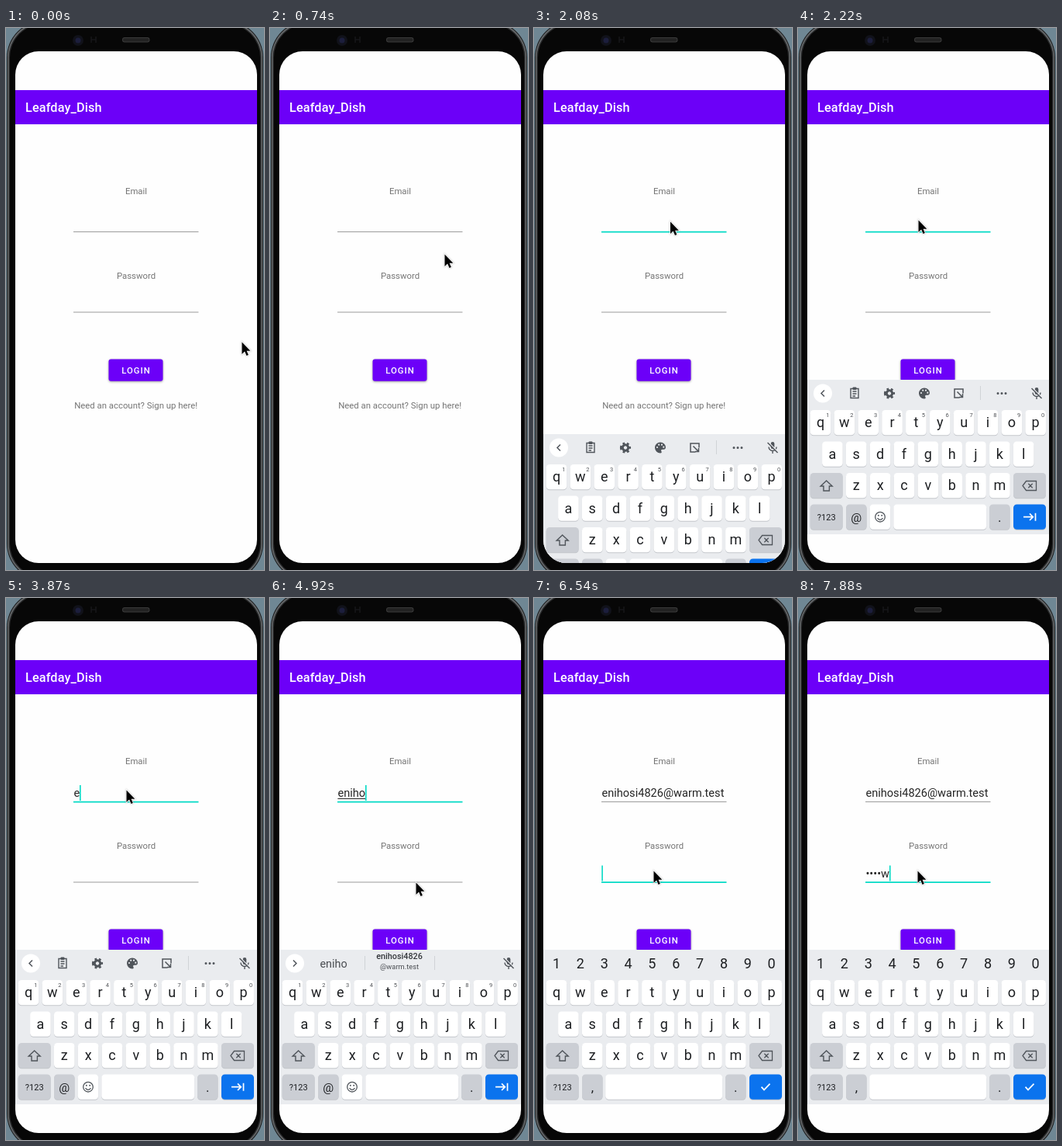
Write an HTML page with a canvas that moves like this. It is 333 by 698 pixels and loops after 8 s.

```html
<!DOCTYPE html>
<html lang="en">
<head>
<meta charset="utf-8">
<title>Login screen</title>
<style>
  html, body { margin: 0; width: 100%; height: 100%; overflow: hidden; background: #000; }
  canvas { display: block; width: 333px; height: 698px; }
</style>
</head>
<body>
<canvas id="stage"></canvas>
<script>
const LOOP = 8000, TICK = 148.8;
const PURPLE = '#6c00f8', TEAL = '#03dac5', GREY = '#757575', ICON = '#50555b', KEY_TEXT = '#1d1f22';
const USER = 'enihosi4826', HOST = '@warm.test', SECRET = 'demow';
const PITCH = 30.85;

const canvas = document.getElementById('stage');
const c = canvas.getContext('2d');
const ratio = window.devicePixelRatio || 1;
canvas.width = 333 * ratio;
canvas.height = 698 * ratio;

// Pointer stops: tick, x, y
const pointerStops = [
  [0, 304, 404], [2, 288, 382], [5, 225, 291], [7, 204, 260], [8, 204, 260], [9, 196, 251],
  [13, 196, 251], [15, 155, 247], [30, 155, 247], [33, 188, 366], [35, 168, 460],
  [37, 168, 460], [40, 167, 380], [42, 154, 351], [53, 154, 351]
];

function pointerAt(n) {
  const i = Math.max(1, pointerStops.findIndex(s => s[0] >= n));
  const [a, ax, ay] = pointerStops[i - 1], [b, bx, by] = pointerStops[i];
  const k = (n - a) / (b - a);
  return [ax + (bx - ax) * k, ay + (by - ay) * k];
}

function box(x, y, w, h, r, fill) {
  c.beginPath();
  c.roundRect(x, y, w, h, r);
  c.fillStyle = fill;
  c.fill();
}

function text(s, x, y, size, color, { align = 'center', weight = 400, spacing = 0 } = {}) {
  c.font = `${weight} ${size}px Roboto, sans-serif`;
  c.letterSpacing = spacing + 'px';
  c.textAlign = align;
  c.fillStyle = color;
  c.fillText(s, x, y);
  return c.measureText(s).width;
}

// Path drawn around its own centre, stroked or filled
function icon(d, x, y, color = ICON, width = 1.4) {
  c.save();
  c.translate(x, y);
  const path = new Path2D(d);
  c.lineWidth = width;
  c.strokeStyle = c.fillStyle = color;
  width ? c.stroke(path) : c.fill(path);
  c.restore();
}

const disc = (x, y, r) => `M${x - r} ${y}a${r} ${r} 0 1 0 ${2 * r} 0a${r} ${r} 0 1 0 ${-2 * r} 0`;

function phone() {
  c.fillStyle = '#6f8794';
  c.fillRect(0, 0, 333, 698);
  box(1, -9, 331, 720, 47, '#1b1c1d');
  box(2, -8, 329, 718, 46, '#66696b');
  box(3.5, -6.5, 326, 715, 45, '#2b2c2d');
  box(5, -5, 323, 712, 43, '#070707');
  icon(disc(0, 0, 7), 93, 16, '#11121a', 0);
  icon(disc(0, 0, 3.5), 93, 16, '#1c1e3c', 0);
  icon('M-3-4V4M3-4V4M-3 0H3', 113, 15, '#17171a', 1.5);
  box(150, 12, 35.5, 6.5, 3.2, '#3a3a3a');
  box(151, 13, 33.5, 4.5, 2.2, '#222');
}

function field(y, value, focused, caret, composing) {
  if (focused) box(87, y + 20.7, 161.5, 1.7, 0, TEAL);
  else box(87, y + 21, 161.5, 1, 0, '#9c9c9c');
  const w = value ? text(value, 87.4, y + 15.2, 14.6, '#252525', { align: 'left' }) : 0;
  if (composing) box(87.4, y + 17, w, 1, 0, '#252525');
  if (caret) box(87.3 + w, y, 1.6, 20, 0, TEAL);
}

function form(s) {
  box(12, 80, 312, 44, 0, PURPLE);
  text('Leafday_Dish', 25, 108, 16.3, '#fff', { align: 'left', weight: 500, spacing: 0.1 });
  text('Email', 168, 214, 11.36, GREY);
  text('Password', 168, 322.5, 11.36, GREY);
  field(241, s.email, s.focus === 'email', s.focus === 'email' && s.caret, s.suggest);
  field(344.5, s.password, s.focus === 'password', s.focus === 'password' && s.caret);
  c.shadowColor = 'rgba(0,0,0,.4)';
  c.shadowBlur = 3 * ratio;
  c.shadowOffsetY = ratio;
  box(132.5, 426.5, 70, 28.3, 3, PURPLE);
  c.shadowColor = 'transparent';
  text('LOGIN', 168, 445, 11.36, '#fff', { weight: 500, spacing: 1 });
  text('Need an account? Sign up here!', 167.7, 490, 11.36, GREY);
}

function key(x, y, w, fill = '#fff', label, size = 18) {
  box(x, y + 1, w, 32.3, 4.5, '#c3c6cb');
  box(x, y, w, 32.3, 4.5, fill);
  if (label) text(label, x + w / 2, y + (size > 14 ? 22 : 20), size, KEY_TEXT);
}

function keyRow(letters, x, y, digits) {
  [...letters].forEach((letter, i) => {
    key(x + i * PITCH, y, 26.6, '#fff', letter);
    if (digits) text((i + 1) % 10, x + i * PITCH + 22.7, y + 9, 7.5, '#505357');
  });
}

function divider(x) { box(x, 461, 1, 18, 0, '#d0d3d7'); }

function micOff() {
  box(305.7, 463, 4.6, 9, 2.3, ICON);
  icon('M-5-1a5 5 0 0 0 10 0M0 4V7.5', 308, 470.5);
  icon('M-6-6L7 7', 308.8, 469.7, '#eaecef', 1.5);
  icon('M-6.5-6.5L6.5 6.5', 308, 470.5);
}

function toolbar() {
  icon('M-5-5.5H5V6.5H-5ZM-2.5-2H2.5M-2.5 1H2.5M-2.5 4H1', 73, 470);
  box(70.5, 462.5, 5, 3.5, 1, ICON);
  c.setLineDash([2.7, 2.8]);
  icon(disc(0, 0, 5.8), 118, 470.5, ICON, 2.6);
  c.setLineDash([]);
  icon(disc(0, 0, 3.7), 118, 470.5, ICON, 3);
  icon('M0-7A7 7 0 0 0 0 7C2 7 2 5.5 1.3 4.5C.5 3 1.5 2.3 3 2.3H4.5C6 2.3 7 1 7-.5C7-4 4-7 0-7Z', 163, 470.5, ICON, 0);
  icon(disc(-4, -.5, 1.1) + disc(-1.8, -3.8, 1.1) + disc(2, -3.8, 1.1) + disc(4.3, -.8, 1.1), 163, 470.5, '#eaecef', 0);
  icon('M1 5.5H-5.5V-5.5H5.5V0M-2-2L4.5 4.5M5 .5V5H.5', 207.5, 470.5, ICON, 1.5);
  divider(235);
  icon(disc(-5, 0, 1.5) + disc(0, 0, 1.5) + disc(5, 0, 1.5), 263, 470.5, ICON, 0);
}

function suggestions(word) {
  text(word, 82, 475.7, 14.4, '#4a4d52');
  divider(122);
  divider(212);
  text(USER, 167, 465, 10.8, '#35383c', { weight: 500 });
  text(HOST, 167, 478, 9.3, '#4a4d52');
}

function keyboard(s) {
  const plain = s.numbers, grey = '#cbced4';
  box(12, 453, 312, 199, 0, '#eaecef');
  if (plain) {
    for (let i = 0; i < 10; i++) text((i + 1) % 10, 29 + i * PITCH, 477.3, 18, KEY_TEXT);
  } else {
    icon(disc(0, 0, 12), 32, 470.5, '#fff', 0);
    icon(s.suggest ? 'M-2-4L2 0L-2 4' : 'M2-4L-2 0L2 4', 32, 470.5, ICON, 1.5);
    s.suggest ? suggestions(s.email) : toolbar();
    micOff();
  }
  keyRow('qwertyuiop', 15.7, 492, !plain);
  keyRow('asdfghjkl', 31.1, 532.5);
  key(15.7, 573, 42, grey);
  icon('M0-7L7.5 0H3.7V6H-3.7V0H-7.5Z', 36.7, 590);
  keyRow('zxcvbnm', 62, 573);
  key(278, 573, 42, grey);
  icon('M-9 0L-4.5-6H8.5V6H-4.5ZM-1.7-2.7L3.7 2.7M3.7-2.7L-1.7 2.7', 299, 589.5, ICON, 1.3);
  key(15.7, 613.5, 42, grey, '?123', 11);
  key(62, 613.5, 26.6, grey, plain ? ',' : '@', plain ? 17 : 15.5);
  if (plain) {
    key(92.2, 613.5, 151, '#fff');
  } else {
    key(92.6, 613.5, 26.6);
    icon(disc(0, 0, 6.3) + 'M-3.5 1.5Q0 6 3.5 1.5', 106, 629.7, ICON, 1.3);
    icon(disc(-2.2, -2, 1) + disc(2.2, -2, 1), 106, 629.7, ICON, 0);
    key(123.3, 613.5, 120);
  }
  key(247, 613.5, 26.6, grey, '.', 17);
  key(278, 613.5, 42, '#0b73ee');
  icon(plain ? 'M-5.5 0L-2 3.7L5.5-4' : 'M-8 0H4M0-4.3L4.3 0L0 4.3M7.5-5V5', 299, 629.7, '#fff', 1.7);
}

function pointer(x, y) {
  const shape = 'M.5 .5V16L4.1 12.6L6.5 18L8.9 17L6.6 11.7H11.4Z';
  c.shadowColor = 'rgba(0,0,0,.3)';
  c.shadowBlur = 2 * ratio;
  icon(shape, x, y, '#fff', 1.6);
  c.shadowColor = 'transparent';
  icon(shape, x, y, '#000', 0);
}

function stateAt(n) {
  const between = (a, b) => n >= a && n < b;
  const typed = [26, 27, 28, 30, 32].filter(k => n >= k).length;
  const chars = Math.max(0, n - 48);
  return {
    email: n >= 37 ? USER + HOST : USER.slice(0, typed),
    password: chars ? '•'.repeat(chars - 1) + SECRET[chars - 1] : '',
    focus: n >= 42 ? 'password' : n >= 10 ? 'email' : '',
    caret: between(11, 14) || between(19, 22) || between(26, 35) || between(37, 47) || n >= 49,
    suggest: between(27, 37),
    keyboard: n >= 14,
    numbers: n >= 43,
    lift: n === 14 ? 70 : 0
  };
}

function draw(time) {
  const n = Math.floor((time % LOOP + 13) / TICK);
  const s = stateAt(n);
  c.setTransform(ratio, 0, 0, ratio, 0, 0);
  phone();
  c.save();
  box(12, 30, 312, 659, 30, '#fefefe');
  c.clip();
  form(s);
  if (s.keyboard) {
    c.translate(0, s.lift);
    keyboard(s);
  }
  c.restore();
  pointer(...pointerAt(n));
}

let start;
function frame(now) {
  start ??= now;
  draw(now - start);
  requestAnimationFrame(frame);
}
requestAnimationFrame(frame);
</script>
</body>
</html>
```
